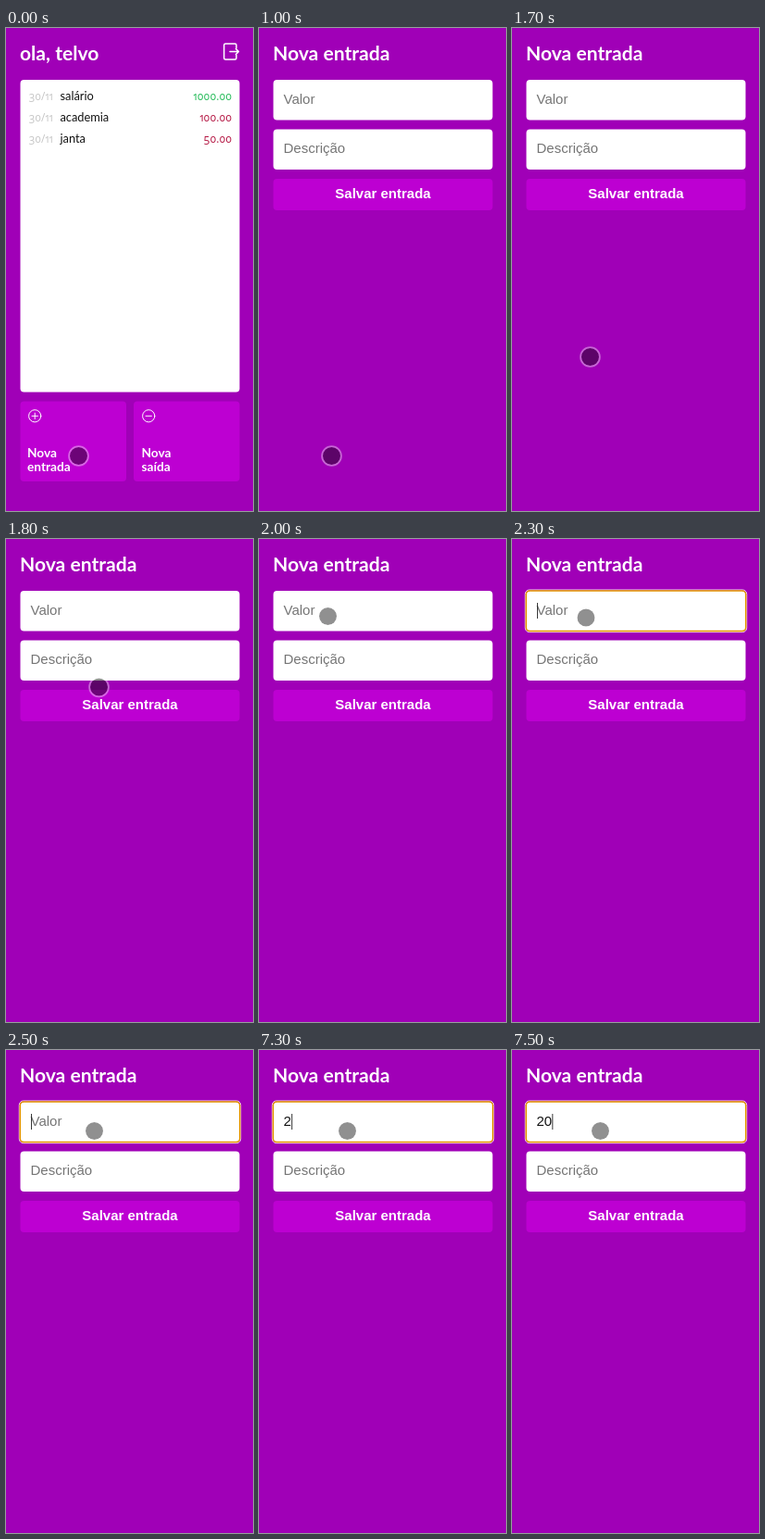
An HTML page for the animation above (8000 ms loop, 267 by 522 pixels).

```html
<!DOCTYPE html>
<html lang="pt">
<head>
<meta charset="utf-8">
<style>
html, body { margin: 0; width: 100%; height: 100%; overflow: hidden; background: #a000b7; }
svg { display: block; width: 100vw; height: 100vh; }
text { font-family: Lato, sans-serif; fill: #fff; }
.title { font-size: 21.1px; font-weight: 700; }
.tile { font-size: 13.7px; font-weight: 700; }
.item { font-size: 12.8px; fill: #111; }
.num { font: 12px "Open Sans", sans-serif; font-variant-numeric: oldstyle-nums; }
.date { font-size: 11.8px; fill: #c6c6c6; }
.in { fill: #1fb954; }
.out { fill: #b3123f; }
.field { font: 15px "Liberation Sans", Arial, sans-serif; fill: #757575; }
.save { font: bold 15px "Liberation Sans", Arial, sans-serif; }
.end { text-anchor: end; }
.mid { text-anchor: middle; }
.card { fill: #fff; }
.btn { fill: #bd00d2; }
.line { fill: none; stroke: #fff; stroke-linecap: round; stroke-linejoin: round; }
</style>
</head>
<body>
<svg viewBox="0 0 267 522">
  <rect width="267" height="522" fill="#a000b7"/>
  <g id="home">
    <text class="title" x="15" y="35">ola, telvo</text>
    <path class="line" stroke-width="1.5" d="M249 21.5V18.5Q249 17 247.5 17H237.2Q235.7 17 235.7 18.5V32.5Q235.7 34 237.2 34H247.5Q249 34 249 32.5V29.5M242 25.5H251.5M248.5 22.5L251.5 25.5L248.5 28.5"/>
    <rect class="card" x="15.5" y="56" width="237" height="337.5" rx="4"/>
    <g id="list"></g>
    <rect class="btn" x="15.5" y="403.5" width="114.5" height="86.5" rx="4"/>
    <rect class="btn" x="138" y="403.5" width="114.5" height="86.5" rx="4"/>
    <path class="line" d="M28 419.3H34.4M31.2 416.1V422.5M151 419.3H157.4"/>
    <circle class="line" cx="31.2" cy="419.3" r="6.6"/>
    <circle class="line" cx="154.2" cy="419.3" r="6.6"/>
    <text class="tile" x="23" y="464">Nova</text>
    <text class="tile" x="23" y="479">entrada</text>
    <text class="tile" x="146.5" y="464">Nova</text>
    <text class="tile" x="146.5" y="479">saída</text>
  </g>
  <g id="form">
    <text class="title" x="15" y="35">Nova entrada</text>
    <rect class="card" x="15.5" y="56" width="237" height="43.5" rx="4"/>
    <rect class="card" x="15.5" y="109.5" width="237" height="43.5" rx="4"/>
    <rect class="btn" x="15.5" y="163" width="237" height="34" rx="4"/>
    <g id="focus" fill="none">
      <rect x="14.3" y="55" width="239.4" height="45.6" rx="4.5" stroke="#fff" stroke-width=".9"/>
      <rect x="15.3" y="56" width="237.4" height="43.6" rx="4" stroke="#e59700" stroke-width="1.5"/>
    </g>
    <text class="field" id="value" x="26.5" y="82"></text>
    <text class="field" x="26.5" y="135">Descrição</text>
    <text class="save mid" x="134" y="184">Salvar entrada</text>
    <rect id="caret" y="69" width=".9" height="17" fill="#222"/>
  </g>
  <g id="touch">
    <circle r="9.5" fill="#080808" fill-opacity=".45"/>
    <circle r="10.4" fill="none" stroke="#fff" stroke-opacity=".4" stroke-width="1.8"/>
  </g>
</svg>
<script>
const $ = id => document.getElementById(id);

const entries = [
  ["salário", "1000.00", "in"],
  ["academia", "100.00", "out"],
  ["janta", "50.00", "out"],
];
$("list").innerHTML = entries.map(([name, amount, kind], i) => {
  const y = 77.5 + i * 23;
  return `<text class="num date" x="24.5" y="${y}">30/11</text>
    <text class="item" x="58.5" y="${y}">${name}</text>
    <text class="num end ${kind}" x="244" y="${y}">${amount}</text>`;
}).join("");

// [start ms, x, y] of the touch point, held until the next entry
const moves = [
  [0, 78.5, 462.5], [1700, 84.5, 355.5], [1800, 100.5, 160], [1900, 92, 48],
  [2000, 74.5, 83.5], [2300, 80, 85], [2400, 90, 87], [2500, 95.5, 87.5],
];
const show = (id, on) => $(id).style.display = on ? "" : "none";

function draw(t) {
  const [, x, y] = moves.findLast(m => m[0] <= t);
  const typed = t < 7300 ? "" : t < 7500 ? "2" : "20";
  show("home", t < 1000);
  show("form", t >= 1000);
  show("focus", t >= 2300);
  show("caret", t >= 2300);
  $("value").textContent = typed || "Valor";
  $("value").style.fill = typed ? "#111" : "";
  $("caret").setAttribute("x", 27 + typed.length * 8.2);
  $("touch").setAttribute("transform", `translate(${x} ${y})`);
}

const start = performance.now();
function tick() {
  draw((performance.now() - start) % 8000);
  requestAnimationFrame(tick);
}
tick();
</script>
</body>
</html>
```
